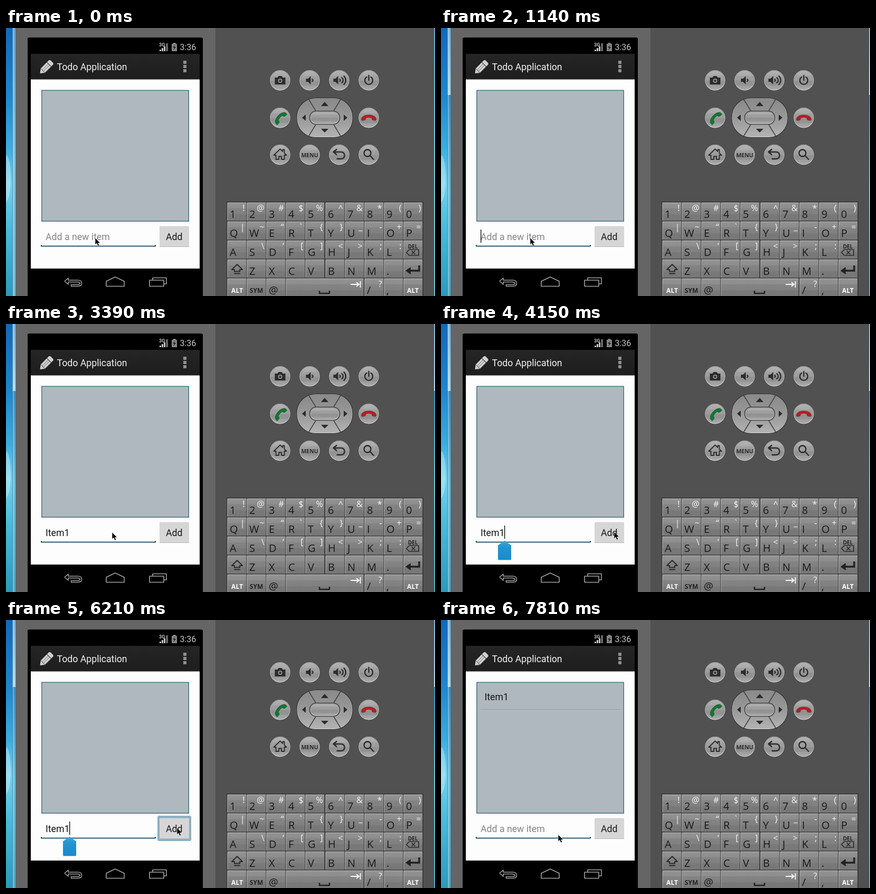
Recreate the animation shown at these times as an HTML page. Size 813 px wide and 508 px high, loop 8 s.

```html
<!DOCTYPE html>
<html lang="en">
<head>
<meta charset="utf-8">
<title>Todo Application</title>
<style>
  html, body { margin: 0; width: 100%; height: 100%; overflow: hidden; background: #525252; }
  svg { display: block; }
  text { white-space: pre; }
  .app { font: 17.7px Roboto, sans-serif; }
  .key { font: 20px "Open Sans", "Noto Sans", sans-serif; fill: #1a1a1a; }
  .alt { font: 16px "Open Sans", "Noto Sans", sans-serif; fill: #f4f4f4; text-anchor: end; }
  .cap { font: bold 12px "Open Sans", "Noto Sans", sans-serif; text-anchor: middle; }
  .ink { fill: none; stroke: #2b2b2b; stroke-width: 2.4; stroke-linejoin: round; stroke-linecap: round; }
  .nav { fill: none; stroke: #a0a0a0; stroke-width: 1.6; stroke-linejoin: round; }
</style>
</head>
<body>
<svg width="813" height="508" viewBox="0 0 813 508">
  <defs>
    <linearGradient id="sky" x2="0" y2="1">
      <stop stop-color="#1268ba"/><stop offset=".25" stop-color="#1f86cf"/>
      <stop offset=".45" stop-color="#3aaee2"/><stop offset=".58" stop-color="#74d2ee"/>
      <stop offset=".75" stop-color="#48bbdc"/><stop offset="1" stop-color="#2a9abd"/>
    </linearGradient>
    <linearGradient id="glassOff" x2="0" y2="1">
      <stop stop-color="#62a9de"/><stop offset=".5" stop-color="#7cc8ea"/><stop offset="1" stop-color="#72bdd8"/>
    </linearGradient>
    <linearGradient id="glassOn" x2="0" y2="1">
      <stop stop-color="#7ab8e4"/><stop offset=".25" stop-color="#b4dcf2"/>
      <stop offset=".25" stop-color="#3c93cc"/><stop offset=".6" stop-color="#6cc6e6"/><stop offset="1" stop-color="#4fadcc"/>
    </linearGradient>
    <linearGradient id="metal" x2="0" y2="1">
      <stop stop-color="#b4b4b4"/><stop offset=".28" stop-color="#a8a8a8"/>
      <stop offset=".28" stop-color="#a0a0a0"/><stop offset=".52" stop-color="#9c9c9c"/>
      <stop offset=".52" stop-color="#919191"/><stop offset=".76" stop-color="#949494"/>
      <stop offset=".76" stop-color="#9c9c9c"/><stop offset="1" stop-color="#ababab"/>
    </linearGradient>
    <linearGradient id="ring" x2="0" y2="1">
      <stop stop-color="#8c8c8c"/><stop offset="1" stop-color="#cfcfcf"/>
    </linearGradient>
    <linearGradient id="oval" gradientUnits="userSpaceOnUse" x1="0" y1="-37" x2="0" y2="37">
      <stop stop-color="#8a8a8a"/><stop offset=".35" stop-color="#939393"/>
      <stop offset=".65" stop-color="#a0a0a0"/><stop offset="1" stop-color="#b4b4b4"/>
    </linearGradient>
    <linearGradient id="keyFace" x2="0" y2="1">
      <stop stop-color="#949494"/><stop offset=".33" stop-color="#8c8c8c"/>
      <stop offset=".33" stop-color="#848484"/><stop offset=".66" stop-color="#808080"/>
      <stop offset=".66" stop-color="#797979"/><stop offset="1" stop-color="#777"/>
    </linearGradient>
    <linearGradient id="bar" x2="0" y2="1"><stop stop-color="#252525"/><stop offset="1" stop-color="#1e1e1e"/></linearGradient>
    <linearGradient id="grip" x2="0" y2="1"><stop stop-color="#43a9db"/><stop offset=".3" stop-color="#2496d3"/><stop offset="1" stop-color="#198acb"/></linearGradient>
  </defs>

  <!-- desktop and window -->
  <rect width="13" height="508" fill="url(#sky)"/>
  <ellipse cy="285" rx="9" ry="44" fill="#d4f4f8" opacity=".4"/>
  <g id="glass"><rect x="12" width="7" height="508"/><rect x="810" width="3" height="508"/></g>
  <path d="M12.5 0V508" stroke="#1b4e70" opacity=".55"/>
  <path d="M13.5 0V508" stroke="#d6eff8" opacity=".7"/>
  <path d="M18.5 0V508" stroke="#3d5866" opacity=".7"/>
  <rect x="19" width="376" height="508" fill="#656565"/>
  <rect x="394" width="3" height="508" fill="#5d5d5d"/>
  <path d="M395.5 0V508" stroke="#727272"/>
  <rect x="397" width="413" height="508" fill="#515151"/>
  <path d="M810.5 0V508" stroke="#2e4350"/>

  <!-- phone -->
  <path d="M41 508V21q0-3 3-3H370q3 0 3 3V508Z" fill="#000"/>
  <text x="290" y="35" font-family="Roboto, sans-serif" font-size="9" font-weight="bold" fill="#c4c4c4">3G</text>
  <path d="M291 44v-3h3v3zM295 44v-6h3v6zM299 44v-9h3v9z" fill="#c4c4c4"/>
  <path d="M303 44V29h4v15z" fill="#666"/>
  <path d="M314 44V30h2.500v-2h5v2h2.500v14z" fill="#858585"/>
  <path d="M321 32l-5 5h3l-2 5 5-6h-3z" fill="#111"/>
  <text x="329.500" y="42" font-family="Roboto, sans-serif" font-size="16" fill="#c8c8c8">3:36</text>
  <rect x="47" y="49" width="320" height="48" fill="url(#bar)"/>
  <g transform="translate(64.500 86) rotate(-45)" fill="#d0d0d0">
    <path d="M0 0L7-5.500V5.500Z"/><path d="M7.500-5.700H23.500V-2H7.500ZM7.500-1.600H23.500V1.600H7.500ZM7.500 2H23.500V5.700H7.500Z"/>
    <path d="M24.500-5.700h4q3 0 3 3v5.400q0 3-3 3h-4z"/>
  </g>
  <text class="app" x="96.500" y="80" fill="#f3f3f3">Todo Application</text>
  <path d="M336 62h6v6h-6zM336 70h6v6h-6zM336 78h6v6h-6z" fill="#8f8f8f"/>
  <rect x="47" y="97" width="320" height="359" fill="#fdfdfd"/>
  <path d="M47 97.500H367" stroke="#aaa"/><path d="M47 98.500H367" stroke="#dcdcdc"/>
  <rect x="67.750" y="118.250" width="278.500" height="248" fill="#aeb8be" stroke="#4b7180" stroke-width="1.500"/>
  <g id="row">
    <text class="app" x="82.500" y="152" fill="#151515">Item1</text>
    <path d="M75 169.500H339" stroke="#96a2a8"/>
  </g>
  <path d="M67 411V413.500H283V411" fill="none" stroke="#2e5b70" stroke-width="2"/>
  <rect id="glow" x="287" y="371" width="64" height="48" rx="3" fill="#4c8ba5"/>
  <rect x="291" y="375.500" width="56" height="39.500" rx="1" fill="#d6d6d6"/>
  <path d="M291 414.500H347" stroke="#b5b5b5"/>
  <text class="app" x="303" y="402" fill="#151515">Add</text>
  <text class="app" id="field" x="75" y="402"></text>
  <rect id="caret" y="382" width="1.300" height="25" fill="#000"/>
  <g id="handle">
    <path d="M120.500 412L133 421V448H108V421Z" fill="#777" opacity=".35"/>
    <path d="M120.500 410.500L133 419.500V445q0 2-2 2H110q-2 0-2-2V419.500Z" fill="url(#grip)"/>
  </g>
  <g class="nav">
    <path d="M118 474l-7 6 7 6v-4.500h17q5 0 5 2.500t-5 2.500H123.500v3H136q7.500 0 7.500-5.700T136 478H118Z"/>
    <path d="M190 489.500V480l17-8 17 8v9.500z"/>
    <path d="M278 477.500V473.500H304V485H299.500M272 478H299V489.500H272Z"/>
  </g>

  <g id="pad"></g>
  <g id="keys"></g>
  <path id="pointer" d="M0-.3V12.700L3 10 5.200 15 7.600 14 5.500 9.400H9.500Z" fill="#000" stroke="#fff" stroke-width=".6"/>
</svg>
<script>
const $ = id => document.getElementById(id);

// Hardware buttons: centre and icon drawn around it
const ink = d => `<path class="ink" d="${d}"/>`;
const solid = (d, color = '#2b2b2b') => `<path d="${d}" fill="${color}"/>`;
const speaker = x => solid(`M${x}-3h4l5-5V8l-5-5h-4z`);
const handset = color => `<path d="M-14 3C-14-8 14-8 14 3Q14 5.500 12 5.500L7.500 4.500Q5.500 4 6 .5Q0-1.500-6 .5Q-5.500 4-7.500 4.500L-12 5.500Q-14 5.500-14 3Z"
  fill="${color}" stroke="#3a3a3a" stroke-width=".6"/>`;
const buttons = [
  [519, 99, solid('M-10-5h5l2-3h6l2 3h5V8h-20z') + '<circle cy="1" r="4" fill="#999"/><circle cy="1" r="2.200" fill="#2b2b2b"/>'],
  [575, 99, speaker(-7) + ink('M5-2q2 2 0 4')],
  [631, 99, speaker(-11) + ink('M1-2q2 2 0 4M5-5q5 5 0 10M9-8q7 8 0 16')],
  [687, 99, ink('M-4-6A7.500 7.500 0 1 0 4-6M0-9V0')],
  [519, 170, `<g transform="rotate(-48)">${handset('#0b7a2c')}</g>`],
  [687, 170, handset('#c01820')],
  [519, 240, `<g style="stroke-width:1.800">${'<path d="M-12 1L0-10.500 5-6V-9.500H8V-3L12 1H8V9H2.500V3.500H-2.500V9H-8V1Z" fill="none" stroke="#2b2b2b" stroke-linejoin="round"/>'}</g>`],
  [575, 240, '<text class="cap" y="4.500" style="font-size:10.500px" fill="#2b2b2b">MENU</text>'],
  [631, 240, ink('M-5-10L-11-5-5 0M-11-5H3Q10-5 10 1.500T3 8H-4')],
  [687, 240, '<circle class="ink" cx="-2.500" cy="-3" r="6.500"/>' + ink('M2.500 2L9 9')],
];
const disc = ([x, y, icon]) => `<g transform="translate(${x + .5} ${y})">
  <circle r="20" fill="#3c3c3c"/><circle r="18.800" fill="url(#metal)" stroke="url(#ring)" stroke-width="1.200"/>${icon}</g>`;
$('pad').innerHTML = buttons.map(disc).join('') + `
  <g transform="translate(604 170)">
    <rect x="-53.500" y="-38" width="107" height="76" rx="36" fill="#343434"/>
    <rect x="-52" y="-36.500" width="104" height="73" rx="35" fill="url(#oval)" stroke="url(#ring)"/>
    <path d="M-31-36L-17-13M31-36L17-13M-31 36L-17 13M31 36L17 13" stroke="#414141" stroke-width="1.500"/>
    <rect x="-28.500" y="-12.500" width="57" height="25" rx="12" fill="url(#metal)" stroke="#424242" stroke-width="1.500"/>
    <rect x="-27" y="-11" width="54" height="22" rx="10.500" fill="none" stroke="url(#ring)"/>
    ${solid('M-7-22L0-30 7-22ZM-7 21L0 28 7 21ZM-36-6V6L-43 0ZM36-6V6L43 0Z')}
  </g>`;

// Keyboard
const KEY = 37.1, esc = s => s.replace(/&/g, '&amp;').replace(/</g, '&lt;');
const rows = [
  ['1234567890', '!@#$%^&*()'],
  ['QWERTYUIOP', '|~“`{}_-+='],
  ['ASDFGHJKL ', ' \\‘[]<>;: '],
  [' ZXCVBNM. ', ''],
  ['  @    /, ', '       ?  '],
];
let html = '<rect x="418" y="329" width="373" height="179" fill="#303030"/>';
rows.forEach(([main, alt], r) => {
  const y = 330 + 36 * r;
  for (let c = 0; c < 10; c++) {
    if (r === 4 && c > 3 && c < 7) continue;
    const x = Math.round(419 + KEY * c), w = r === 4 && c === 3 ? KEY * 4 : KEY;
    html += `<rect x="${x + .5}" y="${y + .5}" width="${w - 1.2}" height="34.800" fill="url(#keyFace)"/>
      <path d="M${x + 1} ${y + 35}V${y + 1.5}H${x + w - 1}" fill="none" stroke="#b0b0b0"/>
      <text class="key" x="${x + 5}" y="${y + 30}">${main[c]}</text>
      <text class="alt" x="${x + w - 3.5}" y="${y + 17}">${esc(alt[c] || '')}</text>`;
  }
});
const cap = (x, y, s, color, size = 12) =>
  `<text class="cap" x="${x}" y="${y}" fill="${color}" style="font-size:${size}px">${s}</text>`;
html += cap(438, 502, 'ALT', '#fff') + cap(771, 502, 'ALT', '#fff') + cap(474.5, 502, 'SYM', '#222')
  + cap(771, 418, 'DEL', '#222', 10)
  + `<g class="ink" style="stroke-width:1.700">
    <path d="M759 425.500L764 420H782V431H764ZM769 422.500l6 6m0-6l-6 6"/>
    <path d="M438 448L428 458H433V461.500H443V458H448ZM433 465.500H443" style="stroke-width:2"/></g>
  <path d="M783 450V460H766" fill="none" stroke="#222" stroke-width="3.500"/>
  <path d="M757 460L767 453V467Z" fill="#222"/>
  <path d="M594 498V503H613V498" fill="none" stroke="#222" stroke-width="2.500"/>
  <path d="M653 486H669M664 482l5 4-5 4M671.500 480V492" fill="none" stroke="#fff" stroke-width="1.800"/>`;
$('keys').innerHTML = html;

// Timeline
const blinks = [120, 580, 1140, 2570, 2840, 3390, 3760, 4300, 4770, 5350, 5820, 6800, 7360, 7810];
const typing = [[0, '', 75], [1420, 'I', 79], [1830, 'Ite', 94], [2100, 'Item', 110], [2840, 'Item1', 120], [6370, '', 75]];
const moves = [
  [0, 169, 398], [3270, 178, 397], [3390, 201, 395], [3510, 228, 393], [3760, 315, 381],
  [3910, 367, 385], [4030, 344, 391], [4150, 328, 394], [4300, 324, 394],
  [7200, 316, 396], [7360, 232, 402], [7500, 222, 407],
];
const at = (steps, t) => steps.findLast(s => s[0] <= t);
const show = (id, on) => $(id).setAttribute('opacity', +on);

function draw(now) {
  const t = now % 8000;
  const [, text, caretX] = at(typing, t), [, x, y] = at(moves, t);
  $('field').textContent = text || 'Add a new item';
  $('field').setAttribute('fill', text ? '#151515' : '#858585');
  $('caret').setAttribute('x', caretX);
  $('pointer').setAttribute('transform', `translate(${x} ${y})`);
  $('glass').setAttribute('fill', t < 270 ? 'url(#glassOff)' : 'url(#glassOn)');
  show('caret', blinks.filter(b => b <= t).length % 2);
  show('handle', t >= 4030 && t < 6370);
  show('row', t >= 6370);
  show('glow', t < 6090 || t >= 6370 ? 0 : t < 6210 ? .4 : .65);
  requestAnimationFrame(draw);
}
draw(0);
</script>
</body>
</html>
```
